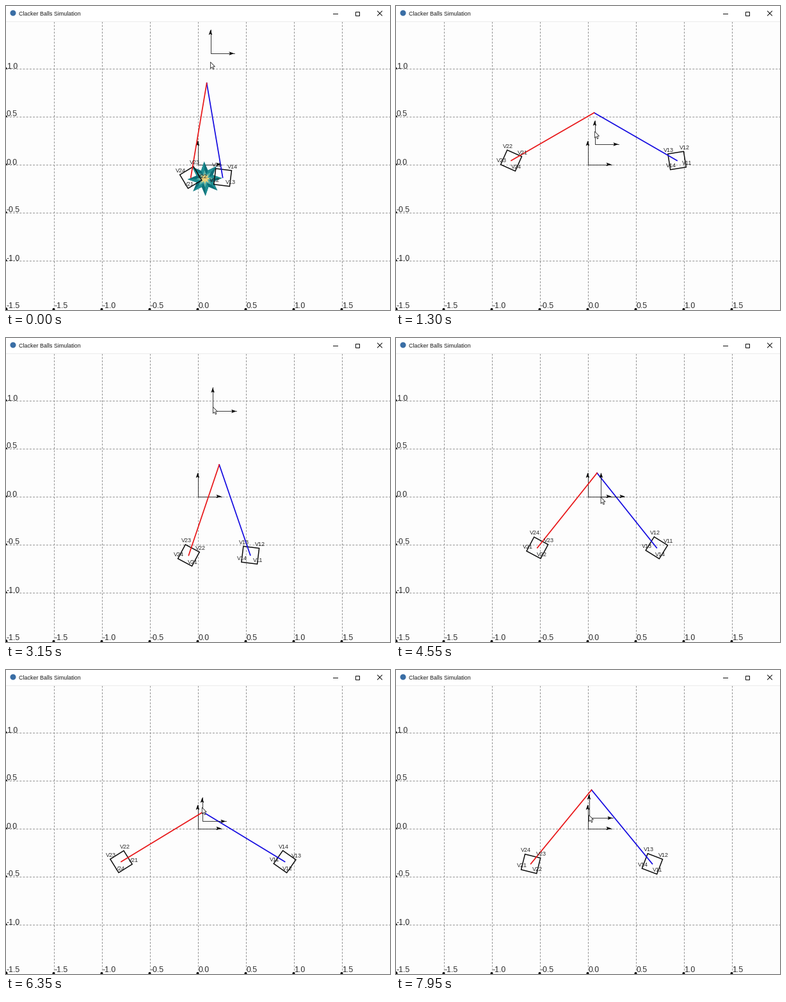
A matplotlib script for the animation above (8000 ms loop, 600 px wide and 475 px high).

```python
import numpy as np
import matplotlib.pyplot as plt
from matplotlib.animation import FuncAnimation
from matplotlib.collections import PolyCollection
from matplotlib.patches import Circle, Polygon, Rectangle

W, H, DPI = 600, 475, 100
FRAMES, STEP = 160, 50
PX = 72 / DPI
UNIT, ARM, CORNER = 150, 149.5, 17.6
OX, OY = 300, 248
BEAT, REST, FLASH = 840, 9.6, 100
RED, BLUE, INK, TEXT = "#e81416", "#1208e0", "#0a0a0a", "#2a2a2a"

plt.rcParams["font.family"] = "Liberation Sans"


class Track:
    """Smooth curve through (time, value) points without overshoot."""

    def __init__(self, *points):
        self.t, self.v = np.array(points, float).T
        d = np.diff(self.v) / np.diff(self.t)
        self.m = np.zeros(len(self.t))
        same = d[:-1] * d[1:] > 0
        a, b = d[:-1][same], d[1:][same]
        self.m[1:-1][same] = 2 * a * b / (a + b)

    def __call__(self, t):
        i = min(np.searchsorted(self.t, t, "right") - 1, len(self.t) - 2)
        h = self.t[i + 1] - self.t[i]
        u = min((t - self.t[i]) / h, 1)
        return ((1 + 2 * u) * (1 - u) ** 2 * self.v[i] + u * (1 - u) ** 2 * h * self.m[i]
                + u * u * (3 - 2 * u) * self.v[i + 1] + u * u * (u - 1) * h * self.m[i + 1])


swing = Track((0, 50), (1300, 51), (2400, 2), (3150, 13), (4550, 30),
              (6350, 50), (7150, 11), (7950, 30))
hand_x = Track((0, 320), (1300, 311), (3600, 325), (6350, 307), (7950, 302))
hand_mid = Track((0, 146), (1300, 154), (2400, 187), (3150, 121), (4550, 204),
                 (6350, 179), (7950, 187))
apex_mid = Track((0, 121), (1300, 132), (3150, 192), (6350, 188), (7950, 167))

SPIN_T = [0, 1300, 2400, 3150, 4550, 6350, 7950]
SPIN = {1: [128, -36, 63, -52, 13, 190, 294],
        2: [-104, 21, 78, -73, -163, -13, -149]}


def bump(t, middle, width):
    return np.exp(-((t - middle) / width) ** 2)


def opening(t):
    """How far the arms swing past their touching angle: one arch per beat."""
    return swing(t) * np.sin(np.pi * (t % BEAT) / BEAT)


def hand_pos(t):
    """The hand pumps once a beat, harder for a wider swing."""
    return hand_x(t), hand_mid(t) - 1.5 * swing(t) * np.cos(2 * np.pi * (t / BEAT + 0.05))


def apex_pos(t):
    """The pivot trails the hand, sinks as the arms open and sways once."""
    sway = 37.5 * np.sin(2 * np.pi * (t - 2775) / 1500) - 12.5
    x = 311 + 0.45 * (hand_x(t) - 313) + sway * bump(t, 2775, 650)
    return x, apex_mid(t) + 0.7 * opening(t)


def ring(x, y, r, degrees):
    a = np.radians(degrees)
    return np.column_stack([x + r * np.cos(a), y - r * np.sin(a)])


fig = plt.figure(figsize=(W / DPI, H / DPI), dpi=DPI, facecolor="#fdfdfd")
ax = fig.add_axes([0, 0, 1, 1])
ax.set(xlim=(0.5, W + 0.5), ylim=(H + 0.5, 0.5))
ax.axis("off")


def line(xs, ys, color=INK, width=1.0, **kw):
    return ax.plot(xs, ys, color=color, lw=width * PX, **kw)[0]


def write(x, y, s, size, color=TEXT, **kw):
    return ax.text(x, y, s, fontsize=size * PX, color=color, va="center_baseline", **kw)


def dot(x, y, r, color=INK):
    ax.add_patch(Circle((x, y), r, fc=color, ec="none", zorder=2))


class Corner:
    """Two thin arrows from one point: up and right."""
    LEN = 37
    EAST = np.array([(0, 0), (-8, 2.8), (-6.5, 0), (-8, -2.8)])
    NORTH = EAST[:, ::-1] * (1, -1) * (1, -1)

    def __init__(self, z):
        self.stem = line([], [], width=0.8, zorder=z)
        self.heads = [ax.add_patch(Polygon(self.EAST, fc=INK, ec="none", zorder=z))
                      for _ in range(2)]

    def move(self, x, y):
        self.stem.set_data([x, x, x + self.LEN], [y - self.LEN, y, y])
        self.heads[0].set_xy(self.EAST + (x + self.LEN, y))
        self.heads[1].set_xy(self.EAST[:, ::-1] * (1, -1) + (x, y - self.LEN))


class Block:
    """A turning square with named corners on the end of an arm."""

    def __init__(self, n, color):
        self.n = n
        self.box = ax.add_patch(Polygon(np.zeros((4, 2)), fill=False, ec=INK,
                                        lw=1.5 * PX, zorder=5))
        self.arm = line([], [], color, 1.7, zorder=6)
        self.names = [write(0, 0, f"V{n}{i}", 9, ha="center", zorder=7) for i in range(1, 5)]

    def move(self, t, x, y, angle):
        a = np.radians(angle)
        end = np.array([x + ARM * np.sin(a), y + ARM * np.cos(a)])
        spin = np.interp(t, SPIN_T, SPIN[self.n])
        corners = ring(*end, CORNER, spin + 90 * np.arange(4))
        self.box.set_xy(corners)
        self.arm.set_data([x, end[0]], [y, end[1]])
        for name, (cx, cy) in zip(self.names, corners):
            name.set_position((cx + 1.5, cy - 7))
        return end


def burst_shapes():
    turn = 92 + 45 * np.arange(8)
    tips, dips = ring(0, 0, 27, turn), ring(0, 0, 14, turn + 22.5)
    star = np.stack([tips, dips], 1).reshape(-1, 2)
    facets = [np.array([(0, 0), p, q]) for p, q in zip(tips, dips)]
    return [star] + facets + [star * 0.5, star * 0.3]


def draw_window():
    ax.add_patch(Rectangle((0, 0), W + 1, 23.5, fc="white", ec="none"))
    line([0, W + 1], [24, 24], "#ececec")
    dot(11.5, 11.5, 4.5, "#3a6ea5")
    write(20.5, 12, "Clacker Balls Simulation", 8.9, "#1a1a1a")
    line([511, 518], [12, 12])
    ax.add_patch(Rectangle((546, 9), 6, 6, fill=False, ec=INK, lw=PX))
    line([581, 588], [8.5, 15.5])
    line([581, 588], [15.5, 8.5])


def draw_grid():
    dash = dict(color="#929292", dashes=(3, 2.2), dash_capstyle="butt", zorder=1)
    for k in range(-3, 4):
        x, y = OX + k * UNIT / 2, OY - k * UNIT / 2
        line([x, x], [24, H + 1], **dash)
        write(x + 0.8, 468.5, f"{k / 2:.1f}", 12.4, zorder=2)
        dot(x, 474.5, 2)
        if k < 3:
            write(1.2, y - 4.5, f"{k / 2:.1f}", 12.4, zorder=2)
            dot(0.5, y, 1.6)
            if k > -3:
                line([0, W + 1], [y, y], **dash)
    dot(1, 474.5, 2)


draw_window()
draw_grid()
Corner(3).move(OX, OY)
hand = Corner(8)
right, left = Block(1, BLUE), Block(2, RED)

BURST = burst_shapes()
burst = PolyCollection(BURST, edgecolors="none", zorder=4,
                       facecolors=["#0d6f78"] + ["#1f8f92"] * 8 + ["#5fb0a4", "#ecd27a"])
ax.add_collection(burst, autolim=False)

POINTER = np.array([(0, 0), (0, 10), (2.3, 7.9), (4, 11.5), (5.5, 10.8), (4, 7.2), (7, 7.2)])
pointer = ax.add_patch(Polygon(POINTER, fc="white", ec="#222222", lw=0.8 * PX, zorder=9))


def draw(i):
    t = i * STEP
    x, y = apex_pos(t)
    half = REST + opening(t)
    lean = 15.4 * bump(t, 2400, 350)
    a = right.move(t, x, y, lean + half)
    b = left.move(t, x, y, lean - half)
    burst.set_visible(t % BEAT < FLASH)
    burst.set_verts([s + (a + b) / 2 + (-3, 2) for s in BURST])
    hand.move(*hand_pos(t))
    pointer.set_xy(POINTER + hand_pos(t + STEP))
    return []


anim = FuncAnimation(fig, draw, frames=FRAMES, interval=STEP, init_func=lambda: draw(0),
                     repeat=True, repeat_delay=0, blit=False)
plt.show()
```
